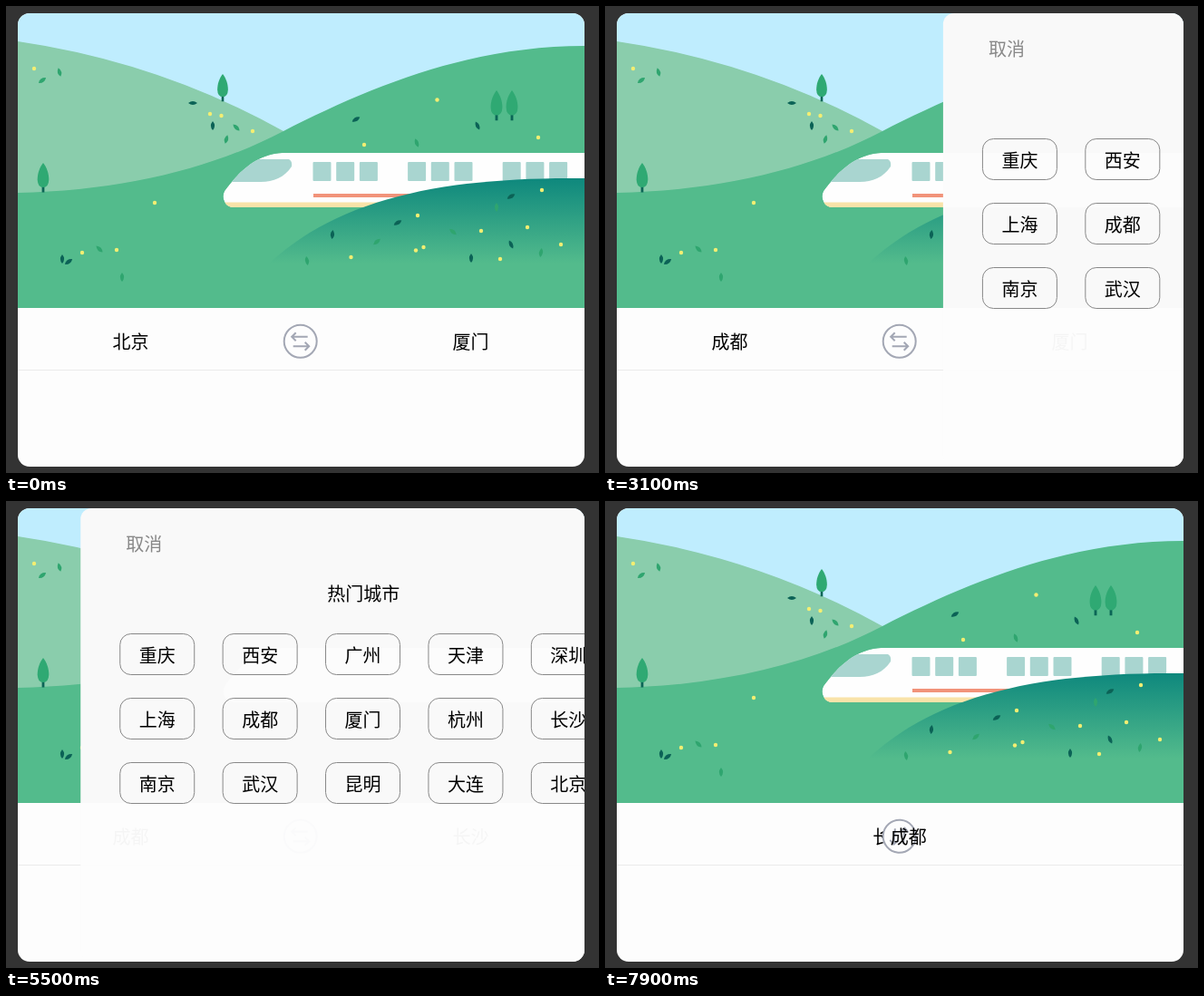
Recreate the animation shown at these times as an HTML page. Size 654 by 515 pixels, loop 8 s.

```html
<!DOCTYPE html>
<html lang="zh-CN">
<head>
<meta charset="utf-8">
<title>车票查询</title>
<style>
  html, body { margin: 0; width: 100%; height: 100%; overflow: hidden; background: #333; }
  svg { display: block; width: 654px; height: 515px; }
  text { font: 20px "Noto Sans CJK SC", "Noto Sans CJK", "Noto Sans", sans-serif; text-anchor: middle; }
</style>
</head>
<body>
<svg viewBox="0 0 654 515">
  <defs>
    <clipPath id="card"><rect x="13" y="8" width="625" height="500" rx="13"/></clipPath>
    <clipPath id="view"><rect x="13" y="8" width="625" height="325"/></clipPath>
    <clipPath id="cover"><rect id="coverBox" x="13" y="8" width="625" height="500" rx="12"/></clipPath>
    <linearGradient id="shade" gradientUnits="userSpaceOnUse" x1="0" y1="190" x2="0" y2="284">
      <stop offset="0" stop-color="#0e887d"/>
      <stop offset="1" stop-color="#53bb8c"/>
    </linearGradient>
    <path id="body" d="M305 162C275 163 255 185 241 204Q238 210 241 216Q244 222 251 222H640V162Z"/>
    <clipPath id="bodyClip"><use href="#body"/></clipPath>
    <g id="tree">
      <path d="M-1.4 23H1.4V32.5H-1.4Z" fill="#0b6556"/>
      <path d="M0 0C4 5 6.3 12 6.3 18.500Q6 27 0 27Q-6 27-6.300 18.500C-6.300 12-4 5 0 0Z" fill="#2fa973"/>
    </g>
    <path id="leaf" d="M0-5Q4.200 0 0 5Q-4.200 0 0-5Z"/>
  </defs>

  <g clip-path="url(#card)">
    <rect x="13" y="8" width="625" height="500" fill="#fdfdfd"/>
    <g clip-path="url(#view)">
      <rect x="13" y="8" width="625" height="325" fill="#bfedfe"/>
      <path d="M13 39Q170 62 306 138L340 333H13Z" fill="#8acdac"/>
      <path d="M13 206C130 204 230 178 306 138C400 90 510 44 638 44V333H13Z" fill="#53bb8c"/>
      <g id="trees"></g>
      <g clip-path="url(#bodyClip)">
        <use href="#body" fill="#fefefe"/>
        <path d="M277 169H312Q316 171 315 177C307 189 295 194 281 194H240V180Z" fill="#a9d5d0"/>
        <path d="M236 216.500H638V222H236Z" fill="#f9e3a9"/>
        <path d="M339 207H638V211H339Z" fill="#f1937a"/>
        <g id="windows" fill="#a9d5d0"></g>
      </g>
      <path d="M290 284C365 214 480 188 638 190V333H290Z" fill="url(#shade)"/>
      <g id="plants"></g>
    </g>
    <path d="M13 401.500H638" stroke="#ebebeb"/>
    <text id="to" y="377.500"></text>
    <g id="swap" fill="none" stroke="#a3a7b4" stroke-width="2">
      <circle r="18" fill="#fdfdfd"/>
      <path d="M8-5H-9M-5-9.500L-9.500-5L-5-.5M-8 5.500H9M5 1L9.500 5.500L5 10"/>
    </g>
    <text id="from" y="377.500"></text>

    <g id="sheet">
      <g clip-path="url(#cover)">
        <rect x="13" y="8" width="625" height="325" fill="#f9f9f9"/>
        <use href="#body" fill="#fff" opacity=".4"/>
        <rect x="13" y="333" width="625" height="175" fill="#fdfdfd" fill-opacity=".97"/>
      </g>
      <g id="panel">
        <text x="83" y="54.500" fill="#888">取消</text>
        <text x="325" y="109.500">热门城市</text>
        <g id="cities"></g>
      </g>
    </g>
  </g>
</svg>
<script>
const $ = id => document.getElementById(id);

function add(parent, tag, attrs, text) {
  const el = document.createElementNS('http://www.w3.org/2000/svg', tag);
  for (const k in attrs) el.setAttribute(k, attrs[k]);
  if (text) el.textContent = text;
  return parent.appendChild(el);
}

// Landscape details
[[239, 75, .93], [41, 173, 1], [541, 93, 1.02], [558, 93, 1.02]].forEach(([x, y, s]) =>
  add($('trees'), 'use', { href: '#tree', transform: `translate(${x} ${y}) scale(${s})` }));

for (let i = 0; i < 9; i++) {
  const x = 338.5 + Math.floor(i / 3) * 104.6 + i % 3 * 25.7;
  add($('windows'), 'rect', { x, y: 172, width: 20, height: 21, rx: 1 });
}

const leaves = {
  '#2fa56f': [[59, 73, -15], [40, 82, 55], [254, 134, -45], [243, 147, 15], [453, 151, -20],
    [103, 268, -45], [128, 299, 0], [332, 281, -10], [409, 260, 50], [541, 222, 0],
    [590, 272, 10], [493, 249, -50]],
  '#0b6256': [[206, 107, 90], [228, 132, 0], [386, 125, 60], [520, 132, -25], [62, 279, 0],
    [69, 282, 55], [360, 252, 5], [432, 239, 60], [557, 210, 60], [557, 263, -25], [513, 278, 0]]
};
for (const fill in leaves)
  for (const [x, y, a] of leaves[fill])
    add($('plants'), 'use', { href: '#leaf', fill, transform: `translate(${x} ${y}) rotate(${a})` });

[[31, 69], [225, 119], [237.5, 121], [272, 138], [395, 153], [475.5, 103.5], [587, 145],
 [164, 217], [122, 269], [84, 272], [380.5, 277], [454, 231], [524, 248], [575, 244],
 [591, 203], [612, 263], [545, 279], [452, 269.5], [460.5, 266]].forEach(([cx, cy]) =>
  add($('plants'), 'circle', { cx, cy, r: 2.2, fill: '#f3ee72' }));

// City picker
const names = '重庆 西安 广州 天津 深圳 上海 成都 厦门 杭州 长沙 南京 武汉 昆明 大连 北京'.split(' ');
const pills = names.map((name, i) => {
  const x = 56.5 + i % 5 * 113.4, y = 146.5 + Math.floor(i / 5) * 71;
  const pill = add($('cities'), 'rect', { x, y, width: 82, height: 45, rx: 12, fill: 'none' });
  add($('cities'), 'text', { x: x + 41, y: y + 31 }, name);
  return pill;
});

// CSS "ease", cubic-bezier(.25, .1, .25, 1)
function ease(t) {
  if (t <= 0) return 0;
  if (t >= 1) return 1;
  let lo = 0, hi = 1, s;
  for (let i = 0; i < 24; i++) {
    s = (lo + hi) / 2;
    if (.75 * s * (1 - s) + s ** 3 < t) lo = s; else hi = s;
  }
  return .3 * s * (1 - s) ** 2 + 3 * s * s * (1 - s) + s ** 3;
}

// Toggles between 0 and 1 at each start time
const toggle = (t, starts) =>
  starts.reduce((v, start, i) => v + (i % 2 ? -1 : 1) * ease((t - start) / 300), 0);

const LOOP = 8000, TICK = 100;
const slides = [1365, 3000, 4500, 5467];
const swaps = [6647, 7263, 7808];
const hovers = [[1900, '南京'], [2000, '上海'], [2300, '成都'], [3300, ''], [5100, '长沙']];

function draw(ms) {
  const t = Math.floor(ms % LOOP / TICK) * TICK;

  const x = 625 * (1 - toggle(t, slides));
  $('sheet').setAttribute('visibility', x > 624.5 ? 'hidden' : 'visible');
  $('coverBox').setAttribute('x', 13 + x);
  $('panel').setAttribute('transform', `translate(${x} 0)`);

  const last = hovers.filter(h => h[0] <= t).pop();
  const hover = last && x < 40 ? last[1] : '';
  pills.forEach((p, i) => p.setAttribute('stroke', names[i] === hover ? '#008000' : '#888'));

  const k = toggle(t, swaps);
  $('from').textContent = t < slides[1] ? '北京' : '成都';
  $('to').textContent = t < slides[3] ? '厦门' : '长沙';
  $('from').setAttribute('x', 137.5 + 375 * k);
  $('to').setAttribute('x', 512.5 - 375 * k);
  $('swap').setAttribute('transform', `translate(324.700 369.700) rotate(${180 * k})`);
}

function loop() {
  draw(performance.now());
  requestAnimationFrame(loop);
}
loop();
</script>
</body>
</html>
```
